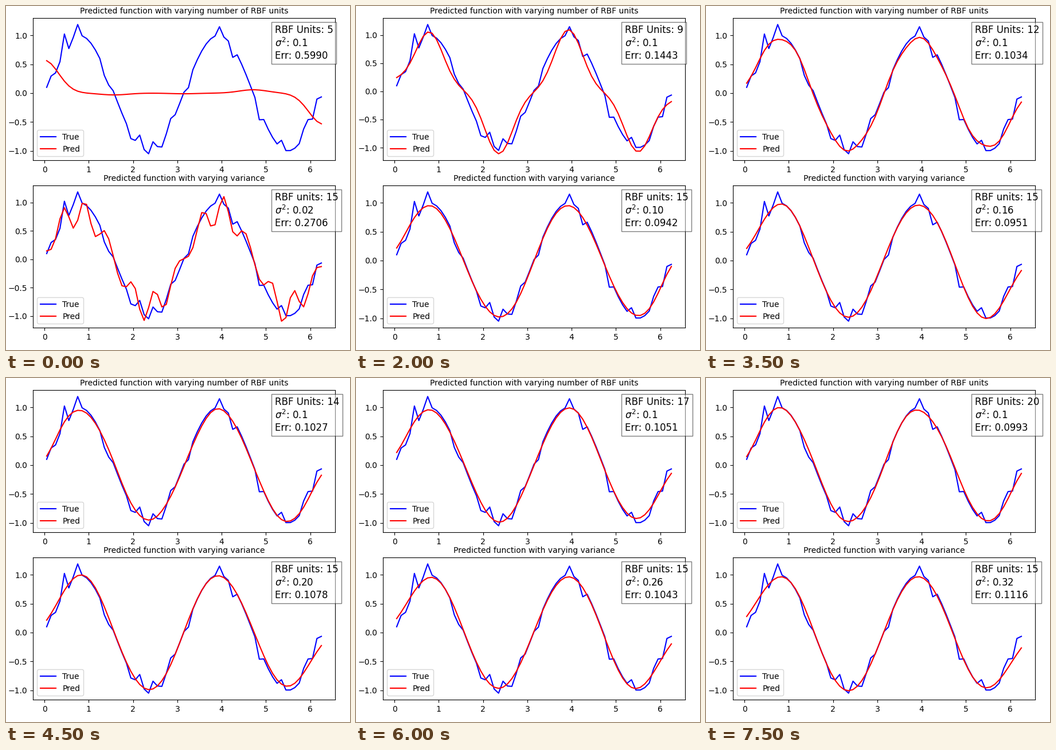
Write a matplotlib script that moves like this. It is 600 px wide and 600 px high and loops after 8000 ms.

```python
import numpy as np
import matplotlib.pyplot as plt
from matplotlib.animation import FuncAnimation

STEPS = 16
SIZE = 600
x = 0.05 + 0.1 * np.arange(63)
clean = np.sin(2 * x)

# Most visible spikes of the measured signal: sample -> offset
SPIKES = {2: -.13, 3: -.1, 4: .24, 5: -.12, 7: .19, 13: -.12, 14: -.1,
          19: -.1, 21: .19, 23: -.05, 24: .14, 26: -.1, 28: .11, 32: -.12,
          39: .15, 42: -.18, 48: -.19, 53: .14, 58: .14, 59: .16, 61: .16}
truth = clean.copy()
truth[list(SPIKES)] += list(SPIKES.values())

# Reported errors at the key steps
KEY_STEPS = [0, 2, 4, 7, 10, 12, 15]
UNIT_ERR = [.5990, .2556, .1443, .1034, .1024, .1051, .0993]
VAR_ERR = [.2706, .1158, .0942, .0951, .1142, .1043, .1116]


def train(units, var, seed, noise=0.05, ridge=0.35):
    """Regularised RBF network fitted to freshly drawn noisy samples."""
    target = clean + np.random.default_rng(seed).normal(0, noise, x.size)
    centres = np.linspace(0, 2 * np.pi, units)
    phi = np.exp(-(x[:, None] - centres) ** 2 / (2 * var))
    gram = phi.T @ phi + ridge * np.eye(units)
    return phi @ np.linalg.solve(gram, phi.T @ target)


fig = plt.figure(figsize=(SIZE / 100, SIZE / 100), dpi=100)


def panel(bottom, title):
    box = np.array([47, bottom, 527, 248]) / SIZE
    ax = fig.add_axes(box)
    ax.set_title(title, fontsize=10)
    ax.plot(x, truth, 'b', label='True')
    line, = ax.plot(x, truth, 'r', label='Pred')
    ax.legend(loc='lower left')
    note = ax.text(0.8, 0.95, '', transform=ax.transAxes, fontsize=12,
                   va='top', bbox=dict(facecolor='white', alpha=0.5))
    return ax, line, note


def show(parts, pred, head, var, err):
    ax, line, note = parts
    line.set_ydata(pred)
    ax.relim()
    ax.autoscale_view()
    note.set_text(f'{head}\n$\\sigma^2$: {var}\nErr: {err:.4f}')


top = panel(331, 'Predicted function with varying number of RBF units')
low = panel(39, 'Predicted function with varying variance')


def draw(i):
    units = 5 + i
    show(top, train(units, 0.1, i), f'RBF Units: {units}', '0.1',
         np.interp(i, KEY_STEPS, UNIT_ERR))
    var = 0.02 * (i + 1)
    show(low, train(15, var, STEPS + i), 'RBF units: 15', f'{var:.2f}',
         np.interp(i, KEY_STEPS, VAR_ERR))
    return top[1], low[1]


anim = FuncAnimation(fig, draw, frames=STEPS, interval=500, repeat=True)
plt.show()
```
